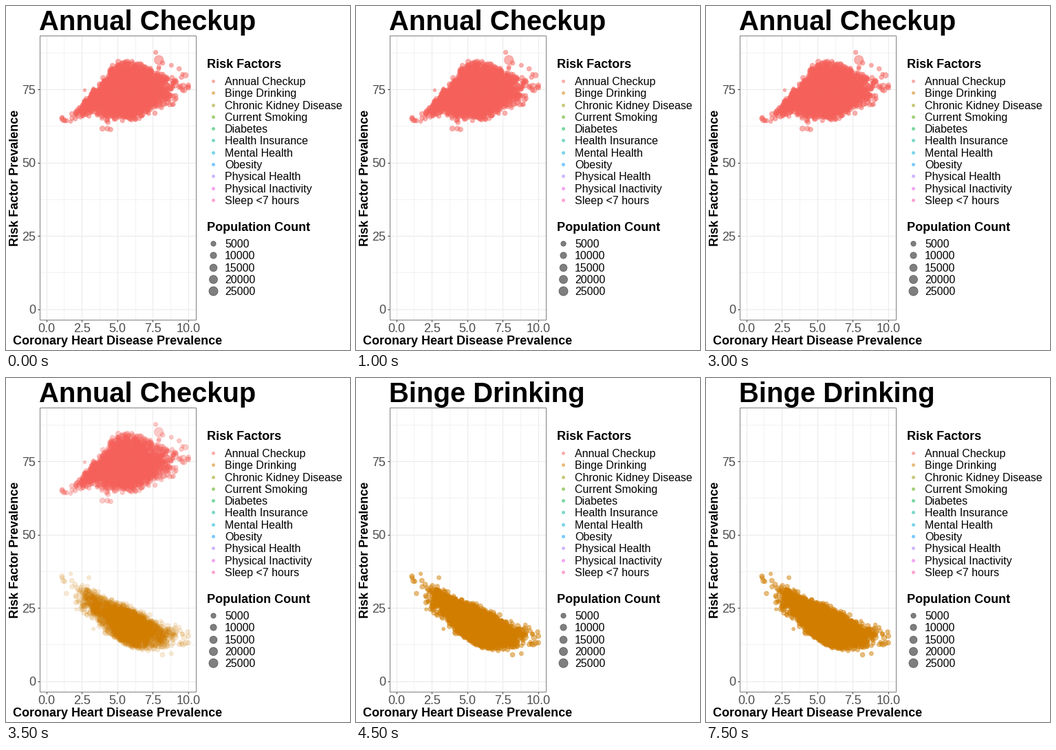
Recreate the animation shown at these times as a matplotlib script. Size 500 by 500 pixels, loop 8000 ms.

```python
import numpy as np
import matplotlib.pyplot as plt
from matplotlib.animation import FuncAnimation
from matplotlib.colors import to_rgba

plt.rcParams["font.family"] = "Liberation Sans"

PX = 0.72  # points per pixel at 100 dpi
FRAMES, STEP = 16, 500
HOLD, FADE = 6, 3  # steps before and during the cross-fade
ALPHA = 0.5
LEFT, RIGHT, TOP, BOTTOM = 49, 275.5, 42.5, 455.5

FACTORS = ["Annual Checkup", "Binge Drinking", "Chronic Kidney Disease",
           "Current Smoking", "Diabetes", "Health Insurance", "Mental Health",
           "Obesity", "Physical Health", "Physical Inactivity",
           "Sleep <7 hours"]
COLORS = ["#F5605A", "#D17D00", "#9C9400", "#4FA600", "#00B24A", "#00B69A",
          "#00AFD9", "#0098FF", "#A574FF", "#EB52E8", "#FF4FA8"]

fig = plt.figure(figsize=(5, 5), dpi=100, facecolor="white")
ax = fig.add_axes([0, 0, 1, 1])
ax.set(xlim=(0, 500), ylim=(500, 0))
ax.axis("off")


def sx(v):
    return 58.6 + 20.65 * np.asarray(v)


def sy(v):
    return 440.6 - 4.26 * np.asarray(v)


def radius(pop):
    return 1.35 + 0.0332 * np.sqrt(pop)


def text(x, y, s, size, color="black", **kw):
    return ax.text(x, y, s, fontsize=size * PX, color=color,
                   va="baseline", **kw)


def line(xs, ys, color, width, z):
    ax.plot(xs, ys, color=color, lw=width * PX, zorder=z,
            solid_capstyle="butt")


def dots(x, y, r, color, alpha):
    rgba = to_rgba(color, alpha)
    return ax.scatter(x, y, s=(2 * np.asarray(r) * PX) ** 2, facecolors=[rgba],
                      edgecolors=[rgba], linewidths=0.7 * PX, zorder=4)


def tracts(n=3000):
    """Heart disease rate, checkup rate, binge rate and population."""
    rng = np.random.default_rng(12)
    kind = rng.choice(3, n, p=[0.83, 0.11, 0.06])
    chd = rng.normal(np.array([5.8, 3.4, 8.1])[kind],
                     np.array([0.92, 0.62, 0.8])[kind])
    chd = np.where((chd < 2.0) | (chd > 9.7), rng.normal(5.8, 0.8, n), chd)

    def between(lo, hi):
        a, b = np.interp(chd, *zip(*lo)), np.interp(chd, *zip(*hi))
        return a + (b - a) * rng.beta(2.7, 2.7, n)

    checkup = between(
        [(2, 64.8), (3.5, 66), (4, 63.5), (4.5, 63), (6, 64), (7.5, 65),
         (8.3, 67.5), (9.2, 68), (9.9, 75)],
        [(2, 67.5), (2.6, 71.5), (3.2, 74.5), (3.8, 79), (4.7, 85),
         (6.4, 85.5), (7.1, 83.5), (8.5, 83), (9.9, 80)])
    binge = between(
        [(2, 25.5), (2.7, 22.5), (3.2, 21), (4, 16.5), (4.7, 14.2),
         (5.4, 12), (6.2, 10.4), (7.5, 10), (9.8, 11.5)],
        [(2, 34), (3, 32.5), (3.9, 31), (4.7, 28.6), (5.4, 27),
         (6.4, 25), (7.3, 22.8), (8, 21), (9, 20), (9.8, 17.8)])
    pop = np.clip(rng.lognormal(np.log(3500), 0.5, n), 250, 14000)
    return chd, checkup, binge, pop


# (heart disease, checkup, binge, population) for the outlying tracts
EXTREMES = np.array([
    (1.10, 65.0, 35.8, 4500), (1.20, 64.5, 34.2, 5500),
    (1.30, 64.3, 34.0, 3000), (1.12, 65.4, 35.3, 3000),
    (1.72, 64.0, 36.6, 1500), (1.80, 66.6, 34.3, 4200),
    (1.82, 65.2, 32.2, 4000), (1.42, 64.3, 29.9, 3500),
    (2.03, 65.0, 33.0, 4200), (3.00, 65.8, 35.3, 2500),
    (2.70, 74.7, 24.5, 700), (3.32, 75.3, 17.8, 1200),
    (2.10, 66.2, 24.5, 900), (3.95, 61.6, 22.0, 5500),
    (4.30, 61.6, 20.0, 4500), (4.52, 61.3, 18.0, 4000),
    (7.70, 87.6, 12.0, 3000), (7.92, 85.0, 17.0, 26000),
    (8.18, 84.0, 9.0, 4000), (8.80, 83.2, 9.4, 2500),
    (9.35, 82.0, 12.5, 3500), (9.80, 79.8, 13.0, 6500),
    (9.95, 75.8, 16.8, 3500), (10.0, 75.6, 15.4, 4500),
    (10.0, 76.4, 13.1, 4000)]).T

chd, checkup, binge, pop = np.hstack([tracts(), EXTREMES])

# panel
GRID = "#EBEBEB"
for v in (0, 2.5, 5, 7.5, 10):
    x = sx(v)
    line([x, x], [TOP, BOTTOM], GRID, 1.1, 1)
    line([x, x], [BOTTOM, BOTTOM + 3.5], "#333333", 1, 1)
    text(x, 474, f"{v:.1f}", 18, "#4D4D4D", ha="center")
    if v < 10:
        line([x + 25.8] * 2, [TOP, BOTTOM], GRID, 0.6, 1)
for v in (0, 25, 50, 75):
    y = sy(v)
    line([LEFT, RIGHT], [y, y], GRID, 1.1, 1)
    line([LEFT - 3.5, LEFT], [y, y], "#333333", 1, 1)
    text(43.5, y + 6.5, str(v), 18, "#4D4D4D", ha="right")
    line([LEFT, RIGHT], [sy(v + 12.5)] * 2, GRID, 0.6, 1)
ax.add_patch(plt.Rectangle((LEFT, TOP), RIGHT - LEFT, BOTTOM - TOP, fill=False,
                           ec="#7F7F7F", lw=PX, zorder=5))

# labels
title = text(48, 35, FACTORS[0], 40, weight="bold")
text(162, 492, "Coronary Heart Disease Prevalence", 18, weight="bold",
     ha="center")
text(18, 249.5, "Risk Factor Prevalence", 18, weight="bold", ha="center",
     rotation=90, rotation_mode="anchor")

# legends
text(292, 90, "Risk Factors", 18, weight="bold")
for i, (name, color) in enumerate(zip(FACTORS, COLORS)):
    y = 109 + 17.28 * i
    dots([300.5], [y], [2.0], color, ALPHA)
    text(318, y + 6, name, 16)
text(292, 327, "Population Count", 18, weight="bold")
for i in range(5):
    count, y = 5000 * (i + 1), 345 + 17.28 * i
    dots([300.5], [y], [radius(count)], "black", ALPHA)
    text(318, y + 6, str(count), 16)

clouds = [dots(sx(chd), sy(rate), radius(pop), color, ALPHA)
          for rate, color in zip((checkup, binge), COLORS)]


def update(k):
    mix = min(max((k - HOLD) / FADE, 0), 1)
    title.set_text(FACTORS[int(mix)])
    for cloud, color, share in zip(clouds, COLORS, (1 - mix, mix)):
        rgba = to_rgba(color, ALPHA * share)
        cloud.set_facecolor([rgba])
        cloud.set_edgecolor([rgba])
        cloud.set_visible(share > 0)
    return [title, *clouds]


anim = FuncAnimation(fig, update, frames=FRAMES, interval=STEP, repeat=True,
                     repeat_delay=0, blit=False)
plt.show()
```
